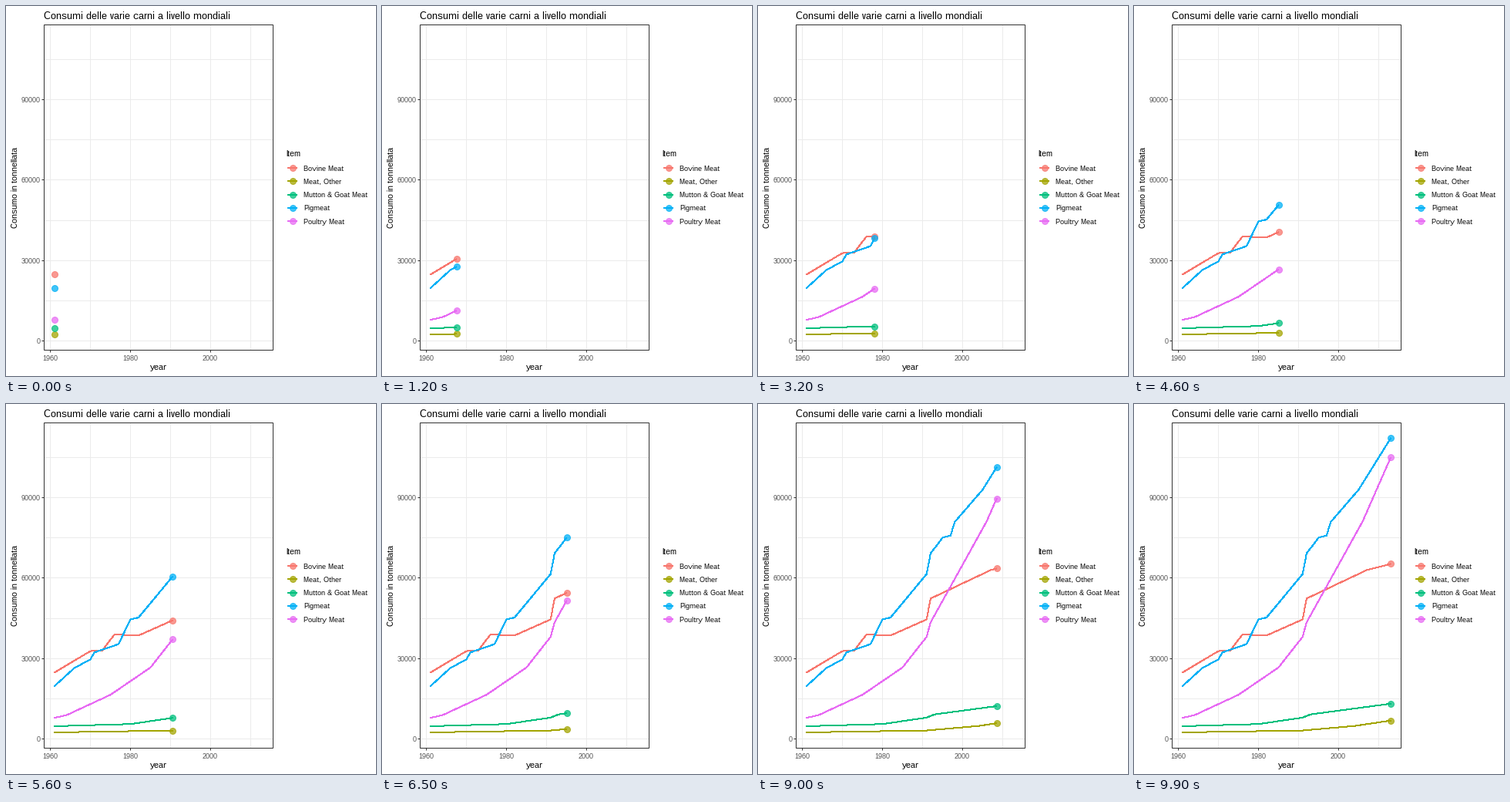
A matplotlib script that plays this animation: 480x480 px, repeating every 10000 ms.

```python
import numpy as np
import matplotlib.pyplot as plt
from matplotlib.animation import FuncAnimation
from matplotlib.patches import Rectangle

plt.rcParams.update({
    "font.family": "Liberation Sans",
    "text.hinting": "native",
    "text.hinting_factor": 1,
})

SIZE, FRAMES = 480, 100
FIRST, LAST = 1961, 2013
GRID, FRAME, TICK = "#EBEBEB", "#333333", "#4D4D4D"
L, R, T, B = 49, 346, 24, 446

# name, colour, turning points (year, thousands) joined by straight segments
SERIES = [
    ("Bovine Meat", "#F8766D", [
        (1961, 24.8), (1970, 32.8), (1973, 33.1), (1976, 39.0), (1982, 38.6),
        (1991, 44.6), (1992, 52.4), (2007, 63.0), (2013, 65.3)]),
    ("Meat, Other", "#A3A500", [
        (1961, 2.5), (1991, 3.2), (2004, 4.9), (2013, 6.9)]),
    ("Mutton & Goat Meat", "#00BF7D", [
        (1961, 4.8), (1980, 5.6), (1991, 8.0), (1993, 9.2), (2013, 13.2)]),
    ("Pigmeat", "#00B0F6", [
        (1961, 19.7), (1966, 26.5), (1970, 29.7), (1971, 32.3), (1977, 35.4),
        (1980, 44.6), (1982, 45.3), (1991, 61.5), (1992, 69.2), (1995, 75.1),
        (1997, 75.9), (1998, 80.9), (2005, 93.0), (2013, 112.2)]),
    ("Poultry Meat", "#E76BF3", [
        (1961, 7.9), (1964, 8.9), (1975, 16.5), (1985, 26.7), (1991, 38.1),
        (1992, 43.5), (2006, 81.2), (2013, 105.0)]),
]

years = np.arange(FIRST, LAST + 1)
# each year falls on a whole step, the head moves evenly in between
steps = np.round((years - FIRST) * (FRAMES - 1) / (LAST - FIRST))


def px(year):
    return 57.5 + 5.2 * (year - 1960)


def py(val):
    return 434.7 - 3.48 * val


fig = plt.figure(figsize=(SIZE / 72, SIZE / 72), dpi=72, facecolor="white")
ax = fig.add_axes([0, 0, 1, 1])
ax.set(xlim=(0, SIZE), ylim=(SIZE, 0))
ax.axis("off")


def rule(xs, ys, color):
    ax.plot(xs, ys, color=color, lw=1, solid_capstyle="butt", zorder=1)


def label(x, y, text, size, color="black", **kw):
    kw.setdefault("va", "baseline")
    ax.text(x, y, text, fontsize=size, color=color, **kw)


def curve(xs, ys, color):
    # without antialiasing every touched pixel is filled, so 1 shows as 2
    return ax.plot(xs, ys, color=color, lw=1, antialiased=False, snap=False,
                   solid_capstyle="butt", solid_joinstyle="round",
                   zorder=3)[0]


def dot(x, y, color):
    return ax.plot([x], [y], "o", ms=8, mew=1, color=color, alpha=0.75,
                   zorder=4)[0]


for year in range(1960, 2011, 10):
    x = int(px(year))
    rule([x, x], [T, B], GRID)
    if year % 20 == 0:
        rule([x, x], [B, B + 3], FRAME)
        label(x, 460, str(year), 9, TICK, ha="center")

for val in range(0, 106, 15):
    y = int(py(val))
    rule([L, R], [y, y], GRID)
    if val % 30 == 0:
        rule([L - 3, L], [y, y], FRAME)
        label(45, y + 4, str(val * 1000), 9, TICK, ha="right")

ax.add_patch(Rectangle((L, T), R - L, B - T, fill=False, ec=FRAME, lw=1,
                       zorder=5))

label(49, 17, "Consumi delle varie carni a livello mondiali", 13)
label(198, 472, "year", 11, ha="center")
label(17.5, 236, "Consumo in tonnellata", 11, rotation=90, ha="right",
      va="center")
label(363, 195, "Item", 11)

heads = []
for i, (name, color, knots) in enumerate(SERIES):
    y = 210 + 17.28 * i
    curve([365, 378], [y, y], color)
    dot(371.5, y, color)
    label(386, round(y + 3.5), name, 9)
    heads.append((*zip(*knots), curve([], [], color), dot(0, 0, color)))


def draw(i):
    now = np.interp(i, steps, years)
    path = np.append(years[years < now], now)
    for kx, kv, line, head in heads:
        xs, ys = px(path), py(np.interp(path, kx, kv))
        line.set_data(xs, ys)
        head.set_data(xs[-1:], ys[-1:])
    return [a for h in heads for a in h[2:]]


anim = FuncAnimation(fig, draw, frames=FRAMES, interval=100, repeat=True,
                     repeat_delay=0, blit=False)
plt.show()
```
